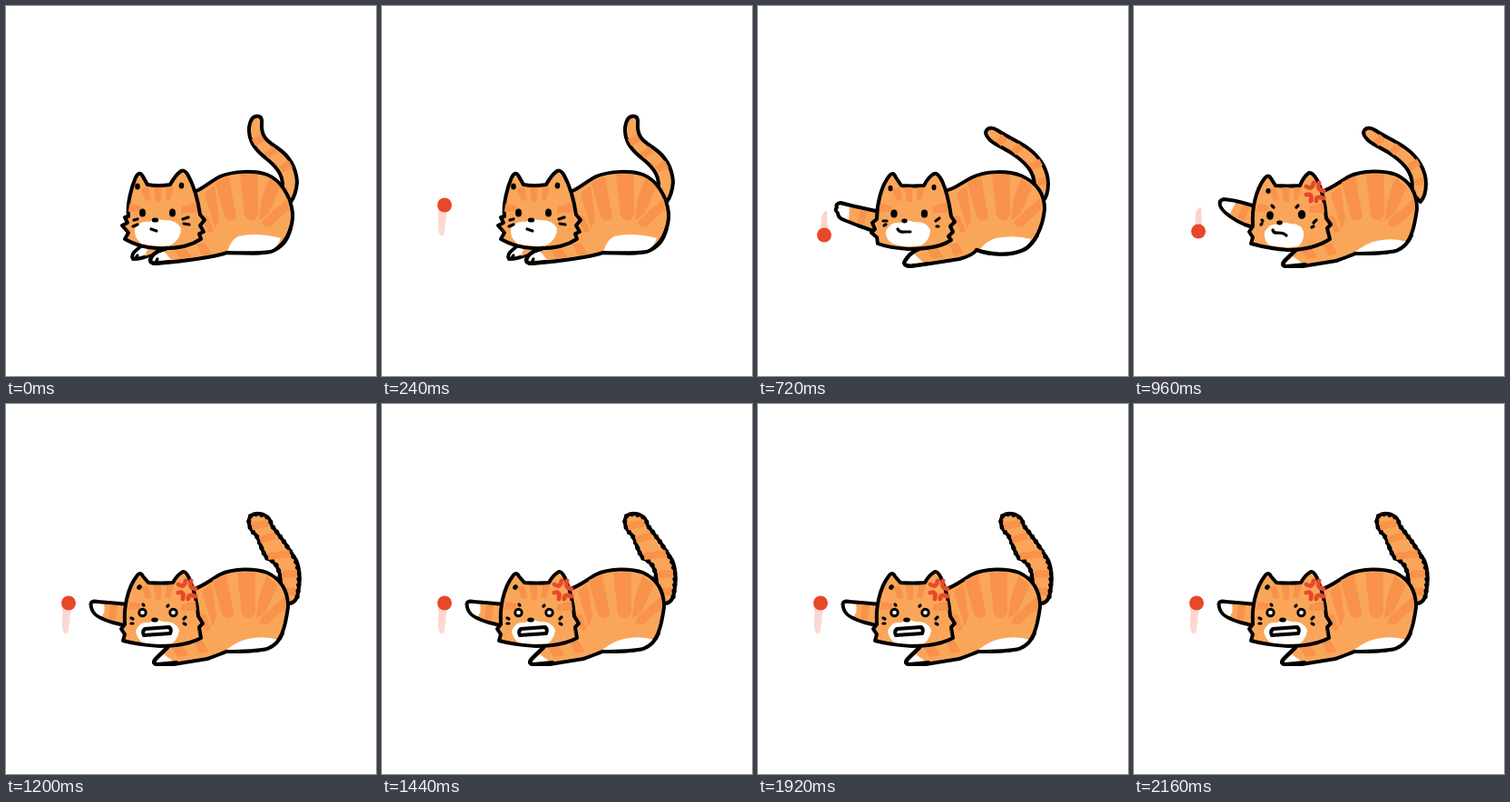
These frames come from a looping animation (408 by 408 pixels, 2280 ms). An HTML page without scripts:

```html
<!DOCTYPE html>
<html lang="en">
<head>
<meta charset="utf-8">
<title>Cat and bouncing ball</title>
<style>
html, body { margin: 0; width: 100%; height: 100%; overflow: hidden; background: #fff; }
svg { display: block; width: 100vw; height: 100vh; }
.o { fill: #f9a65a; stroke: #000; stroke-width: 4; stroke-linejoin: round; stroke-linecap: round; }
.w { fill: #fff; }
.line { fill: none; stroke: #000; stroke-width: 4; stroke-linejoin: round; stroke-linecap: round; }
.thin { stroke-width: 3.2; }
.s { fill: #f9924b; stroke: #f9924b; stroke-width: 2; stroke-linejoin: round; }
.band { fill: none; stroke: #f9924b; stroke-width: 8; }
.fluff { fill: none; stroke: #000; stroke-width: 5.2; stroke-linecap: round; stroke-dasharray: 0 6.5; }
.red { fill: none; stroke: #e8482a; stroke-width: 4.8; stroke-linecap: round; stroke-linejoin: round; }
.pose { visibility: hidden; animation: 2.28s step-end infinite; }

/* 19 steps of 120 ms */
#sit { animation-name: sit; }
#sway { animation-name: sway; }
#watch { animation-name: watch; }
#lift { animation-name: lift; }
#swat { animation-name: swat; }
#crossLift { animation-name: cross-lift; }
#cross { animation-name: cross; }
#rageDown { animation-name: rage-down; }
#rageUp { animation-name: rage-up; }
@keyframes sit { 0% { visibility: visible } 5.2632%, 100% { visibility: hidden } }
@keyframes sway { 0%, 10.5263%, 100% { visibility: hidden } 5.2632% { visibility: visible } }
@keyframes watch { 0%, 15.7895%, 100% { visibility: hidden } 10.5263% { visibility: visible } }
@keyframes lift {
  0%, 21.0526%, 31.5789%, 100% { visibility: hidden }
  15.7895%, 26.3158% { visibility: visible }
}
@keyframes swat {
  0%, 26.3158%, 36.8421%, 100% { visibility: hidden }
  21.0526%, 31.5789% { visibility: visible }
}
@keyframes cross-lift { 0%, 42.1053%, 100% { visibility: hidden } 36.8421% { visibility: visible } }
@keyframes cross { 0%, 47.3684%, 100% { visibility: hidden } 42.1053% { visibility: visible } }
@keyframes rage-down {
  0%, 52.6316%, 63.1579%, 73.6842%, 84.2105%, 94.7368%, 100% { visibility: hidden }
  47.3684%, 57.8947%, 68.4211%, 78.9474%, 89.4737% { visibility: visible }
}
@keyframes rage-up {
  0%, 57.8947%, 68.4211%, 78.9474%, 89.4737% { visibility: hidden }
  52.6316%, 63.1579%, 73.6842%, 84.2105%, 94.7368%, 100% { visibility: visible }
}
</style>
</head>
<body>
<svg viewBox="0 0 408 408" role="img" aria-label="An orange cat swats at a red ball">
<defs>
  <!-- shared markings -->
  <g id="stripes" class="s">
    <path d="M220 207L229 200L234 234L231 243Z"/>
    <path d="M232 195L245 189L253 232Q248 239 242 232Z"/>
    <path d="M259 187L277 187L277 230Q271 240 264 231Z"/>
    <path d="M291 191L301 200L289 228L280 235Q281 214 291 191Z"/>
    <path d="M310 214L311 224L291 242Q281 244 285 236Z"/>
    <path d="M217 232L222 233L228 248L224 249Z"/>
    <path d="M188 270L198 269L203 276L193 278ZM212 264L219 262L225 272L217 274Z"/>
  </g>
  <g id="marks" class="s">
    <path d="M150 202L156 201L159 213L155 214ZM164 201L170 201L170 215L166 215ZM178 201L184 201L180 213L177 213Z"/>
    <path d="M137 219L147 221L147 225L136 226ZM208 218L195 222L194 227L209 227Z"/>
  </g>
  <g id="anger" class="red">
    <path d="M190 199Q197 203 198 195M204 195Q201 202 209 204M190 208Q197 206 195 215M201 215Q200 209 209 212"/>
  </g>

  <!-- ball -->
  <g id="down">
    <path fill="#fdd3cc" d="M67 246L68 229Q71 221 74 222L75 246Z"/>
    <circle cx="71" cy="248.500" r="8" fill="#e8482a"/>
  </g>
  <g id="up">
    <path fill="#fdd8d3" d="M62 222L62 246Q63 253 66 253.500Q69 253 69 248L72 222Z"/>
    <circle cx="69" cy="219.500" r="8" fill="#e8482a"/>
  </g>

  <!-- tails -->
  <g id="tailUp">
    <path class="o" d="M304 206C308 189 300 179 288 169C275 159 267 149 268 134Q270 121 277 121.500Q283 121 282 130C281 146 290 150 300 157C313 166 320 179 321 194Q320 208 314 216Z"/>
    <path class="band" d="M273 151L283 145M287 165L297 158M303 180L314 174"/>
  </g>
  <g id="tailLeft">
    <path class="o" d="M304 206C308 186 297 175 285 166C272 156 264 155 256 148Q249 141 252 137Q256 132 264 137C274 144 287 149 298 157C312 167 320 182 320 196Q320 209 314 216Z"/>
    <path class="band" d="M265 152L272 144M282 162L290 154M301 178L312 172M308 194L317 193"/>
  </g>
  <g id="tailFluff">
    <path class="o" d="M303 206C304 186 300 176 288 170C283 166 280 151 276 145C267 137 266 128 270 123Q275 119 284 122Q292 125 293 134C302 145 312 159 320 172C326 187 324 201 321 213Q317 221 310 220Z"/>
    <path class="fluff" d="M302 190C300 178 297 174 288 170C283 166 280 151 276 145C267 137 266 128 270 123Q275 120 284 123Q291 125 293 134C302 145 312 159 319 172C325 187 323 201 321 213"/>
    <path class="band" d="M271 135L289 131M280 150L297 145M289 168L313 165M304 188L321 187M306 206L319 207"/>
  </g>

  <!-- bodies -->
  <g id="bodySit">
    <path class="o w" d="M140 279Q137 274 145 268L152 262L178 265L160 274Q150 279 140 279Z"/>
    <path fill="#f9a65a" d="M157 266L176 266L161 273L153 276Z"/>
    <path class="line thin" d="M145 275L143 278"/>
    <path class="o" d="M205 206C216 203 224 194 236 188C250 182 275 181 288 186C303 192 314 210 316 228C317 246 308 262 296 269C285 275 262 272 244 272C228 277 200 281 166 284Q156 284 160 277Q165 270 176 267Z"/>
    <use href="#stripes"/>
    <path class="w" d="M244 271Q248 258 256 254Q277 249 303 256Q300 266 291 270Q270 273 244 271ZM161 281Q165 271 174 270L182 280Z"/>
    <path class="line" d="M314 244C310 262 302 267 292 271Q278 273 244 272M180 282L163 284Q157 282 161 276Q166 270 176 268"/>
    <path class="line thin" d="M167 279L165 283"/>
  </g>
  <g id="bodyReach">
    <path class="o" d="M205 204C216 203 222 196 236 189C250 182 275 181 290 187C306 194 316 205 316 224C314 246 304 262 295 268C281 276 255 275 241 269Q237 275 222 279L190 284L168 287Q159 286 162 281Q167 272 178 267Z"/>
    <use href="#stripes"/>
    <path class="w" d="M244 269Q252 259 262 256Q282 252 301 257Q297 265 292 268Q268 276 244 269ZM163 284Q166 276 172 273L182 283Z"/>
    <path class="line" d="M308 253Q301 265 292 269C276 276 256 274 241 269M188 284L168 287Q158 286 163 280Q168 272 178 268"/>
  </g>
  <g id="bodyRage">
    <path class="o" d="M205 205C216 202 224 195 236 188C250 181 275 181 288 186C303 193 311 206 311 224C308 246 304 261 292 268C278 274 258 272 243 273Q236 276 222 281L185 287L166 287Q160 286 166 280L179 267Z"/>
    <use href="#stripes" x="-3"/>
    <path class="w" d="M243 271Q256 261 267 259Q284 255 300 260Q294 268 286 270Q262 272 243 271ZM166 284L174 276L185 284L168 286Z"/>
    <path class="line" d="M305 253Q300 265 288 270Q274 273 243 273M188 285L167 287Q160 286 166 280L178 269"/>
  </g>

  <!-- raised paws -->
  <g id="armReach">
    <path class="o" d="M134 227C120 223 104 221 91 217Q85 218 87 222Q84 225 88 228Q88 234 95 236L110 242L130 249Z"/>
    <path class="band" d="M117 226L113 240"/>
    <path class="w" d="M101 222L90 219.500Q88 221 89 223Q87 225 90 228Q91 233 96 234L100 236Z"/>
  </g>
  <g id="armCross">
    <path class="o" d="M134 221C123 218 113 214 99 213Q93 214 95 220C98 228 112 237 122 241L134 245Z"/>
    <path class="band" d="M124 221L118 235"/>
    <path class="w" d="M112 217L100 215.500Q96 216 97 220Q99 225 106 229Z"/>
  </g>
  <g id="armRage">
    <path class="o" d="M134 221C120 219 108 219 97 217.500Q92 218 94 224C96 234 108 238 118 241L134 245Z"/>
    <path class="band" d="M119 222L117 238"/>
    <path class="w" d="M108 221L98 220Q95 220 96 224Q98 232 106 234Q110 228 108 221Z"/>
  </g>

  <!-- heads -->
  <g id="headSit">
    <path class="o" d="M135 232C133 218 139 198 143 189Q147 181 151 188L156 197Q168 199 181 197Q187 186 193 182Q197 180 201 187C208 200 212 216 214 230L219 236L214 242L218 249L213 251L215 257C200 267 180 268 165 267C150 266 138 261 131 257L135 250L128 242L134 239L131 233Z"/>
    <use href="#marks"/>
    <path class="w" d="M142 246Q148 236 158 238Q165 232 172 236Q188 235 193 245Q193 258 181 264Q164 266 149 262Q141 255 142 246Z"/>
    <ellipse cx="150.500" cy="228" rx="3.500" ry="4.500"/><ellipse cx="183.500" cy="228" rx="3.500" ry="4.500"/>
    <ellipse cx="164.500" cy="236" rx="3.800" ry="2.600"/>
    <ellipse cx="145" cy="199" rx="2.800" ry="3.500"/><ellipse cx="193.500" cy="198" rx="2.800" ry="3.500"/>
    <path class="line thin" d="M160 246L166 248M141 236L145 235M140 243L145 241M195 235L201 233M196 240L202 241"/>
  </g>
  <g id="headReach">
    <path class="o" d="M131 235C131 218 136 198 145 187Q149 182 152 189L158 198Q170 199 183 198Q188 188 194 185Q198 183 203 193C209 206 211 218 213 232L217 238L212 243L215 249L210 254L213 258C200 267 182 268 166 268C150 267 140 265 132 262L131 255L125 250L129 246L126 239Z"/>
    <use href="#marks" x="-1"/>
    <path class="w" d="M141 248Q147 237 157 239Q163 234 171 238Q186 237 190 247Q190 258 180 264Q162 267 148 262Q140 256 141 248Z"/>
    <ellipse cx="150" cy="229" rx="3.700" ry="4.500"/><ellipse cx="183.500" cy="229" rx="3.700" ry="4.500"/>
    <ellipse cx="161.500" cy="237" rx="3.200" ry="2.400"/>
    <ellipse cx="146" cy="201" rx="2.500" ry="3.200"/><ellipse cx="194" cy="200" rx="2.500" ry="3.200"/>
    <path class="line thin" d="M154 246Q156 250 162 249L168 249M138 237L142 237M139 242L141 241M196 237L200 234M197 243L199 243"/>
  </g>
  <g id="headCross">
    <path class="o" d="M131 240C130 224 134 203 144 190Q148 185 151 190L156 198Q170 199 183 198Q187 188 193 184Q197 183 202 192C209 206 211 220 212 234L217 241L213 245L216 257C202 266 186 269 170 269C154 268 140 265 129 262L131 255L127 249L131 243Z"/>
    <use href="#marks"/>
    <path class="w" d="M144 249Q150 239 158 241Q164 237 172 240Q185 240 187 249Q188 260 181 265Q163 268 148 263Q143 257 144 249Z"/>
    <ellipse cx="150" cy="231" rx="4" ry="4.800"/><ellipse cx="185" cy="230" rx="4.200" ry="5"/>
    <ellipse cx="160.500" cy="239" rx="3.200" ry="2.400"/>
    <ellipse cx="148" cy="204" rx="2.600" ry="3"/>
    <path class="line thin" d="M153 247Q154 251 159 250Q165 250 168 253M152 220L154 222M181 220L179 222M141 236L142 237M140 241L141 240M198 239L201 236M196 244L198 243"/>
    <use href="#anger"/>
  </g>
  <g id="headRage">
    <path class="o" d="M131 240C130 224 134 203 144 190Q148 184 151 190L157 197Q170 198 184 197Q189 188 195 185Q198 184 202 192C208 206 211 220 212 234L217 242L213 246L215 258C202 265 186 267 170 267C154 266 140 264 129 261L131 254L127 248L131 243Z"/>
    <use href="#marks"/>
    <path class="w" d="M143 250Q148 239 158 241Q165 236 173 240Q187 239 191 249Q190 259 183 264Q164 266 150 263Q144 258 143 250Z"/>
    <circle cx="150.500" cy="230" r="5.200"/><circle class="w" cx="150.500" cy="230" r="2.300"/>
    <circle cx="184.500" cy="230" r="5.200"/><circle class="w" cx="184.500" cy="230" r="2.300"/>
    <ellipse cx="164" cy="238" rx="3.800" ry="2.600"/>
    <ellipse cx="147" cy="202" rx="2.600" ry="3" transform="rotate(35 147 202)"/>
    <path class="o w" d="M153 248Q166 247 180 246Q183 249 181 253Q167 254 152 255Q150 251 153 248Z"/>
    <path class="line thin" d="M151 221L152 222M179 222L178 223M138 236L140 237M138 242L140 242M196 237L198 235M196 242L198 243"/>
    <use href="#anger"/>
  </g>
</defs>

<rect width="408" height="408" fill="#fff"/>
<g class="pose" id="sit">
  <use href="#tailUp"/><use href="#bodySit"/><use href="#headSit"/>
</g>
<g class="pose" id="sway">
  <use href="#tailLeft"/><use href="#bodySit"/><use href="#headSit"/>
</g>
<g class="pose" id="watch">
  <use href="#tailUp"/><use href="#bodySit"/><use href="#headSit"/><use href="#up"/>
</g>
<g class="pose" id="lift">
  <use href="#tailUp"/><use href="#bodyReach"/>
  <use href="#armReach" transform="rotate(-7 131 238)"/>
  <use href="#headReach"/><use href="#up"/>
</g>
<g class="pose" id="swat">
  <use href="#tailLeft"/><use href="#bodyReach"/><use href="#armReach"/>
  <use href="#headReach"/><use href="#down" x="2" y="4"/>
</g>
<g class="pose" id="crossLift">
  <use href="#tailUp"/><use href="#bodyRage"/>
  <use href="#armCross" transform="rotate(-7 131 232)"/>
  <use href="#headCross"/><use href="#up"/>
</g>
<g class="pose" id="cross">
  <use href="#tailLeft" x="2"/><use href="#bodyRage" x="1"/><use href="#armCross"/>
  <use href="#headCross"/><use href="#down"/>
</g>
<g class="pose" id="rageDown">
  <use href="#tailFluff" x="2" y="-2"/><use href="#bodyRage"/>
  <use href="#armRage" transform="rotate(-7 131 232)"/>
  <use href="#headRage"/><use href="#down"/>
</g>
<g class="pose" id="rageUp">
  <use href="#tailFluff"/><use href="#bodyRage"/><use href="#armRage"/>
  <use href="#headRage"/><use href="#up"/>
</g>
</svg>
</body>
</html>
```
